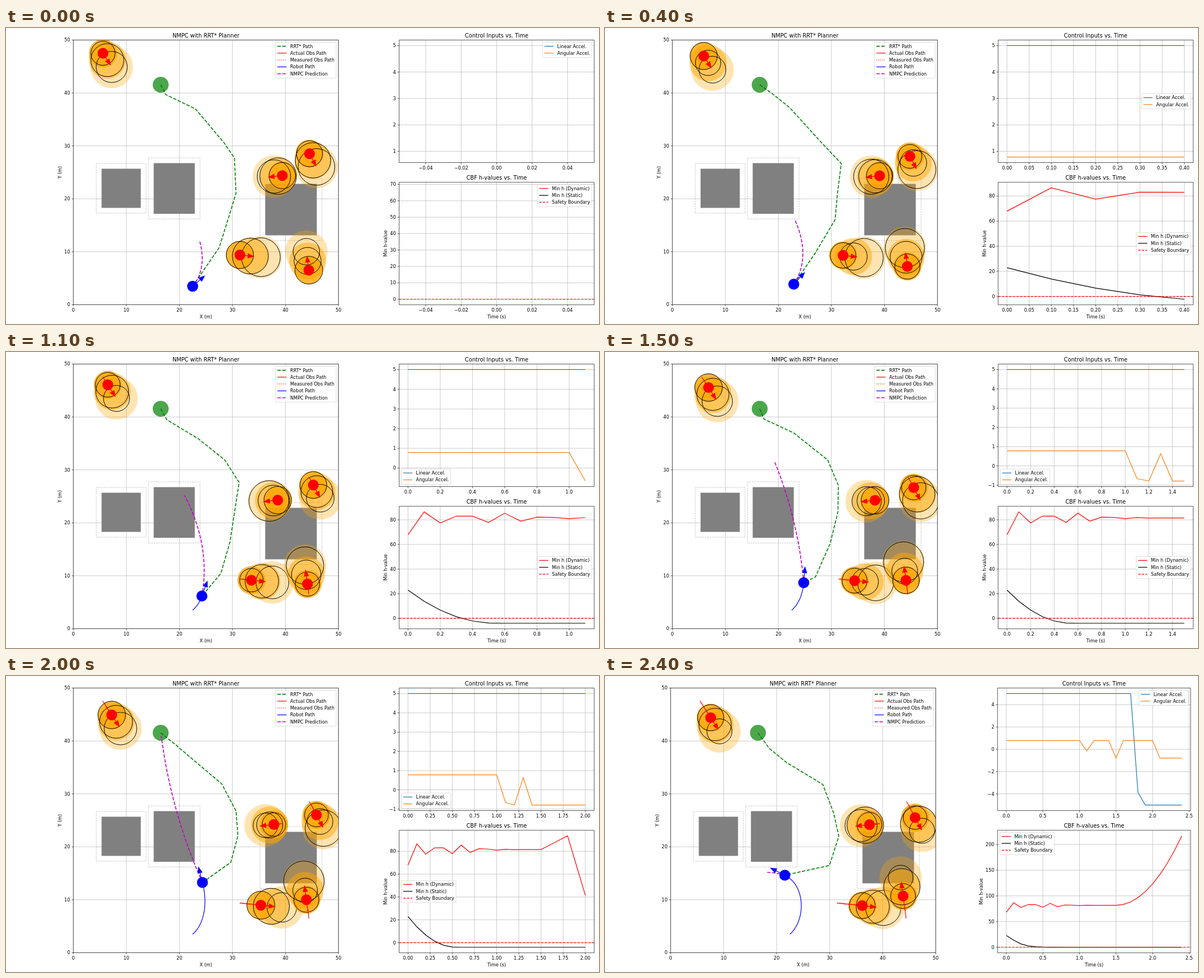
Write an HTML page with a canvas that moves like this. It is 1058 px wide and 529 px high and loops after 2500 ms.

```html
<!DOCTYPE html>
<html lang="en">
<head>
<meta charset="utf-8">
<title>Planner simulation</title>
<style>
html, body { margin: 0; width: 100%; height: 100%; overflow: hidden; background: #fff; }
canvas { display: block; }
</style>
</head>
<body>
<canvas id="stage" width="1058" height="529"></canvas>
<script>
const ctx = document.getElementById('stage').getContext('2d');
const FONT = 8.16, PT = 0.8164;
const DASH = [3.7, 1.6], DOT = [1, 1.65];
const FIELD = { x: 120.2, y: 21.5, w: 473, h: 473 };
const GOAL = [276, 101.5];
const REPLAN = 21; // from this step (0.1 s each) on the braking run is shown

const BLOCKS = [[170.5, 251.5, 70, 70], [263.5, 241.5, 73.3, 90.5], [462.5, 278.5, 92, 92]];
const OBSTACLES = [ // velocity in pixels per step
  { start: [173, 45.2], velocity: [.78, 1.22] },
  { start: [493, 263.8], velocity: [-.75, .08] },
  { start: [417.3, 405.6], velocity: [1.87, .2] },
  { start: [541.5, 224.7], velocity: [.62, 1.18] },
  { start: [540.3, 432.8], velocity: [-.22, -1.65] }
];
const HALOS = [ // one per predicted position
  { radius: 25, alpha: .8, ring: 21, spread: 4 },
  { radius: 33, alpha: .5, ring: 22, spread: 11 },
  { radius: 38, alpha: .3, ring: 22, spread: 15 }
];
const WAYPOINTS = [[292, 122], [335, 150], [391, 200], [414, 240], [414, 290], [404, 340], [383, 400]];

// The robot follows one Bézier curve per run.
const RUNS = {
  drive: {
    curve: [[333, 461.5], [352, 445], [361, 410], [350.5, 369]],
    reach: n => (n / 20) ** 1.66,
    horizon: n => [345 - 1.2 * n - .11 * n * n, 379 - 8.2 * n - .27 * n * n],
    linear: () => 5,
    angular: i => i <= 10 ? .785 : i === 11 ? -.66 : i === 13 ? .63 : -.785,
    trend: k => 4 * Math.min(k, 3) - 26 * Math.max(k - 3, 0),
    still: i => 26.9 * (Math.max(5.4 - i, 0) / 5.4) ** 2 - 4
  },
  brake: {
    curve: [[333, 461.5], [361, 437], [362, 375], [324, 356]],
    reach: n => 1 - (24 - n) * .048,
    horizon: () => [292, 351],
    linear: i => i <= 17 ? 5 : i === 18 ? -3.87 : -5,
    angular: i => i > 20 || i === 15 ? -.785 : i === 11 ? -.15 : .785,
    trend: k => 1.67 * k * k,
    still: i => 22.9 * Math.exp(-.5 * i ** 1.35)
  }
};

// Start-up jump, a wobble that dies out, then the trend of the run.
function dynamicMargin(run, i) {
  if (i === 0) return 67.9;
  const wobble = 5 * Math.cos((i - 1) * Math.PI * .8) * Math.exp(-((i / 8.5) ** 4));
  return 81.5 + wobble + run.trend(Math.max(i - 15, 0));
}

const mix = (a, b, k) => a.map((v, i) => v + (b[i] - v) * k);
const along = (p, d, k) => [p[0] + d[0] * k, p[1] + d[1] * k];

function random(...seeds) {
  const v = Math.sin(seeds.reduce((sum, s) => sum * 17.3 + s + 1, 0)) * 43758.5453;
  return v - Math.floor(v);
}
const jitter = (p, size, ...seeds) => p.map((v, a) => v + (random(a, ...seeds) * 2 - 1) * size);

function bezier([a, b, c, d], u) {
  const ab = mix(a, b, u), bc = mix(b, c, u), cd = mix(c, d, u);
  const p = mix(ab, bc, u), q = mix(bc, cd, u);
  return { at: mix(p, q, u), angle: Math.atan2(q[1] - p[1], q[0] - p[0]) };
}

function stroke(color, width, dash = []) {
  ctx.strokeStyle = color;
  ctx.lineWidth = width * PT;
  ctx.setLineDash(dash.map(d => d * width * PT));
  ctx.stroke();
  ctx.setLineDash([]);
}

function line(points, color, width = 1.5, dash) {
  ctx.beginPath();
  points.forEach(p => ctx.lineTo(...p));
  stroke(color, width, dash);
}

function disc(center, r, color, alpha = 1) {
  ctx.globalAlpha = alpha;
  ctx.fillStyle = color;
  ctx.beginPath();
  ctx.arc(...center, r, 0, 7);
  ctx.fill();
  ctx.globalAlpha = 1;
}

function ring(center, r) {
  ctx.beginPath();
  ctx.arc(...center, r, 0, 7);
  stroke('#000', 1.2);
}

function arrow(from, angle, length, color) {
  ctx.save();
  ctx.translate(...from);
  ctx.rotate(angle);
  line([[0, 0], [length - 11, 0]], color, 1.6);
  ctx.fillStyle = color;
  ctx.beginPath();
  ctx.moveTo(length, 0);
  ctx.lineTo(length - 12, -4.7);
  ctx.lineTo(length - 12, 4.7);
  ctx.fill();
  ctx.restore();
}

function setFont(size) { ctx.font = `${size}px "DejaVu Sans", sans-serif`; }
function textWidth(s) { setFont(FONT); return ctx.measureText(s).width; }

function text(s, x, y, align = 'center', size = FONT) {
  setFont(size);
  ctx.fillStyle = '#000';
  ctx.textAlign = align;
  ctx.fillText(s, x, y + size * .365);
}

function sideText(s, x, y) {
  ctx.save();
  ctx.translate(x, y);
  ctx.rotate(-Math.PI / 2);
  text(s, 0, 0);
  ctx.restore();
}

function ticks([lo, hi]) {
  const raw = (hi - lo) / 9, power = 10 ** Math.floor(Math.log10(raw));
  const step = +([1, 2, 2.5, 5, 10].find(s => s * power >= raw - 1e-9) * power).toPrecision(3);
  const digits = (String(step).split('.')[1] || '').length;
  const list = [];
  for (let i = Math.ceil(lo / step - 1e-9); i * step <= hi + 1e-9; i++)
    list.push({ value: i * step, label: (i * step).toFixed(digits).replace('-', '−') });
  return list;
}

function scales(box, xr, yr) {
  return {
    sx: v => box.x + (v - xr[0]) / (xr[1] - xr[0]) * box.w,
    sy: v => box.y + box.h - (v - yr[0]) / (yr[1] - yr[0]) * box.h
  };
}

function grid(box, xr, yr) {
  const { sx, sy } = scales(box, xr, yr), bottom = box.y + box.h;
  for (const t of ticks(xr)) {
    const x = sx(t.value);
    line([[x, box.y], [x, bottom]], '#b0b0b0', .8);
    line([[x, bottom], [x, bottom + 2.9]], '#000', .8);
    text(t.label, x, bottom + 9.3);
  }
  for (const t of ticks(yr)) {
    const y = sy(t.value);
    line([[box.x, y], [box.x + box.w, y]], '#b0b0b0', .8);
    line([[box.x - 2.9, y], [box.x, y]], '#000', .8);
    text(t.label, box.x - 5.7, y, 'right');
  }
}

function frame(box, title) {
  ctx.beginPath();
  ctx.rect(box.x, box.y, box.w, box.h);
  stroke('#000', .8);
  text(title, box.x + box.w / 2, box.y - 8.3, 'center', 9.8);
}

function clipped(box, draw) {
  ctx.save();
  ctx.beginPath();
  ctx.rect(box.x, box.y, box.w, box.h);
  ctx.clip();
  draw();
  ctx.restore();
}

// Puts the legend in the first corner or side that no sampled point touches.
function legend(box, rows, points = []) {
  const w = 29.4 + Math.max(...rows.map(r => textWidth(r.name))), h = 12.3 * rows.length + 2.6;
  const left = box.x + 4.1, right = box.x + box.w - 4.1 - w;
  const top = box.y + 4.1, bottom = box.y + box.h - 4.1 - h, middle = box.y + (box.h - h) / 2;
  const spots = [[right, top], [left, top], [left, bottom], [right, bottom], [right, middle], [left, middle]];
  const [x, y] = spots.find(([a, b]) =>
    !points.some(([px, py]) => px > a && px < a + w && py > b && py < b + h)) || spots[4];
  ctx.beginPath();
  ctx.roundRect(x, y, w, h, 1.7);
  ctx.fillStyle = 'rgba(255,255,255,.8)';
  ctx.fill();
  stroke('rgba(204,204,204,.8)', 1);
  rows.forEach((r, i) => {
    const cy = y + 7 + i * 12.3;
    line([[x + 3.3, cy], [x + 19.6, cy]], r.color, r.width, r.dash);
    text(r.name, x + 26.1, cy, 'left');
  });
}

function chart(box, title, xr, yr, series) {
  const { sx, sy } = scales(box, xr, yr), samples = [];
  grid(box, xr, yr);
  clipped(box, () => series.forEach(s => {
    const points = s.points.map(([a, b]) => [sx(a), sy(b)]);
    line(points, s.color, 1.5, s.dash);
    points.forEach((p, i) => {
      for (let k = 0; k <= 1; k += .05) samples.push(mix(p, points[i + 1] || p, k));
    });
  }));
  frame(box, title);
  legend(box, series, samples);
}

function padded(values) {
  const lo = Math.min(...values), hi = Math.max(...values), pad = (hi - lo) * .05;
  return [lo - pad, hi + pad];
}

function drawBlock([x, y, w, h]) {
  ctx.fillStyle = '#808080';
  ctx.fillRect(x, y, w, h);
  ctx.beginPath();
  ctx.rect(x - 9.4, y - 9.4, w + 18.8, h + 18.8);
  stroke('rgba(128,128,128,.5)', 1, DASH);
}

function drawObstacles(n) {
  OBSTACLES.forEach(({ start, velocity }, j) => {
    const ahead = k => along(start, velocity, n + k * 10);
    HALOS.forEach((h, k) => disc(ahead(k), h.radius, 'orange', h.alpha));
    HALOS.forEach((h, k) => ring(ahead(k), h.ring + h.spread * random(n, j, k)));
  });
  OBSTACLES.forEach(({ start, velocity }, j) => {
    const now = along(start, velocity, n);
    const measured = Array.from({ length: n + 1 }, (_, i) => jitter(along(start, velocity, i), 1.3, i, j));
    disc(now, 9.6, 'red');
    line([start, now], 'red', 1.3);
    line(measured, 'red', 1.3, DOT);
    arrow(now, Math.atan2(velocity[1], velocity[0]), 26, 'red');
  });
}

function drawRobot(run, n) {
  const reach = run.reach(n), robot = bezier(run.curve, reach);
  const [x, y] = robot.at;
  const stops = WAYPOINTS.filter(p => p[1] < y - 12).map((p, i) => jitter(p, 9, n, i));
  line([GOAL, ...stops, robot.at], 'green', 2, DASH);
  line(Array.from({ length: 41 }, (_, i) => bezier(run.curve, reach * i / 40).at), 'blue');

  // The prediction leaves along the heading, turning slightly left.
  const end = run.horizon(n), bend = Math.hypot(end[0] - x, end[1] - y) / 2, turn = robot.angle - .17;
  ctx.beginPath();
  ctx.moveTo(x, y);
  ctx.quadraticCurveTo(x + bend * Math.cos(turn), y + bend * Math.sin(turn), ...end);
  stroke('#bf00bf', 2, DASH);
  disc(robot.at, 9.8, 'blue');
  arrow(robot.at, robot.angle, 29.5, 'blue');
}

function drawField(run, n) {
  grid(FIELD, [0, 50], [0, 50]);
  clipped(FIELD, () => {
    BLOCKS.forEach(drawBlock);
    disc(GOAL, 14.2, 'green', .7);
    drawObstacles(n);
    drawRobot(run, n);
  });
  frame(FIELD, 'NMPC with RRT* Planner');
  text('X (m)', FIELD.x + FIELD.w / 2, 516.3);
  sideText('Y (m)', FIELD.x - 24, FIELD.y + FIELD.h / 2);
  legend(FIELD, [
    { name: 'RRT* Path', color: 'green', width: 2, dash: DASH },
    { name: 'Actual Obs Path', color: 'red' },
    { name: 'Measured Obs Path', color: 'red', dash: DOT },
    { name: 'Robot Path', color: 'blue' },
    { name: 'NMPC Prediction', color: '#bf00bf', width: 2, dash: DASH }
  ]);
}

function draw(n) {
  const run = n >= REPLAN ? RUNS.brake : RUNS.drive;
  const history = get => Array.from({ length: n + 1 }, (_, i) => [i / 10, get(i)]);
  const linear = history(run.linear), angular = history(run.angular);
  const dynamic = history(i => dynamicMargin(run, i)), still = history(run.still);
  const values = (...sets) => sets.flat().map(p => p[1]);
  const xr = n ? [-n / 200, n * .105] : [-.055, .055];
  const inputRange = padded(values(linear, angular));
  const safetyRange = padded([0, ...values(dynamic, still)]);

  // Wide tick labels squeeze the layout a little.
  const last = ticks(xr).at(-1);
  const labelEnd = 701.4 + (last.value - xr[0]) / (xr[1] - xr[0]) * 348 + textWidth(last.label) / 2;
  const over = Math.max(0, labelEnd - 1048.7);
  const extra = safetyRange[1] >= 100 ? 5.2 : 0;
  const left = 701.4 - .644 * (over + extra) + extra;
  const upper = { x: left, y: 21.5, w: 1049.4 - over - left, h: 219 };
  const lower = { ...upper, y: 275.7 };

  ctx.fillStyle = '#fff';
  ctx.fillRect(0, 0, 1058, 529);
  ctx.save();
  ctx.translate(-.322 * (over + extra), 0);
  drawField(run, n);
  ctx.restore();

  chart(upper, 'Control Inputs vs. Time', xr, inputRange, [
    { name: 'Linear Accel.', color: '#1f77b4', points: linear },
    { name: 'Angular Accel.', color: '#ff7f0e', points: angular }
  ]);
  chart(lower, 'CBF h-values vs. Time', xr, safetyRange, [
    { name: 'Min h (Dynamic)', color: 'red', points: dynamic },
    { name: 'Min h (Static)', color: '#000', points: still },
    { name: 'Safety Boundary', color: 'red', dash: DASH, points: [[xr[0], 0], [xr[1], 0]] }
  ]);
  text('Time (s)', lower.x + lower.w / 2, 516.3);
  sideText('Min h-value', left - 24.4 - extra, lower.y + lower.h / 2);
}

const start = performance.now();
function tick() {
  draw(Math.floor((performance.now() - start) % 2500 / 100));
  requestAnimationFrame(tick);
}
tick();
</script>
</body>
</html>
```
